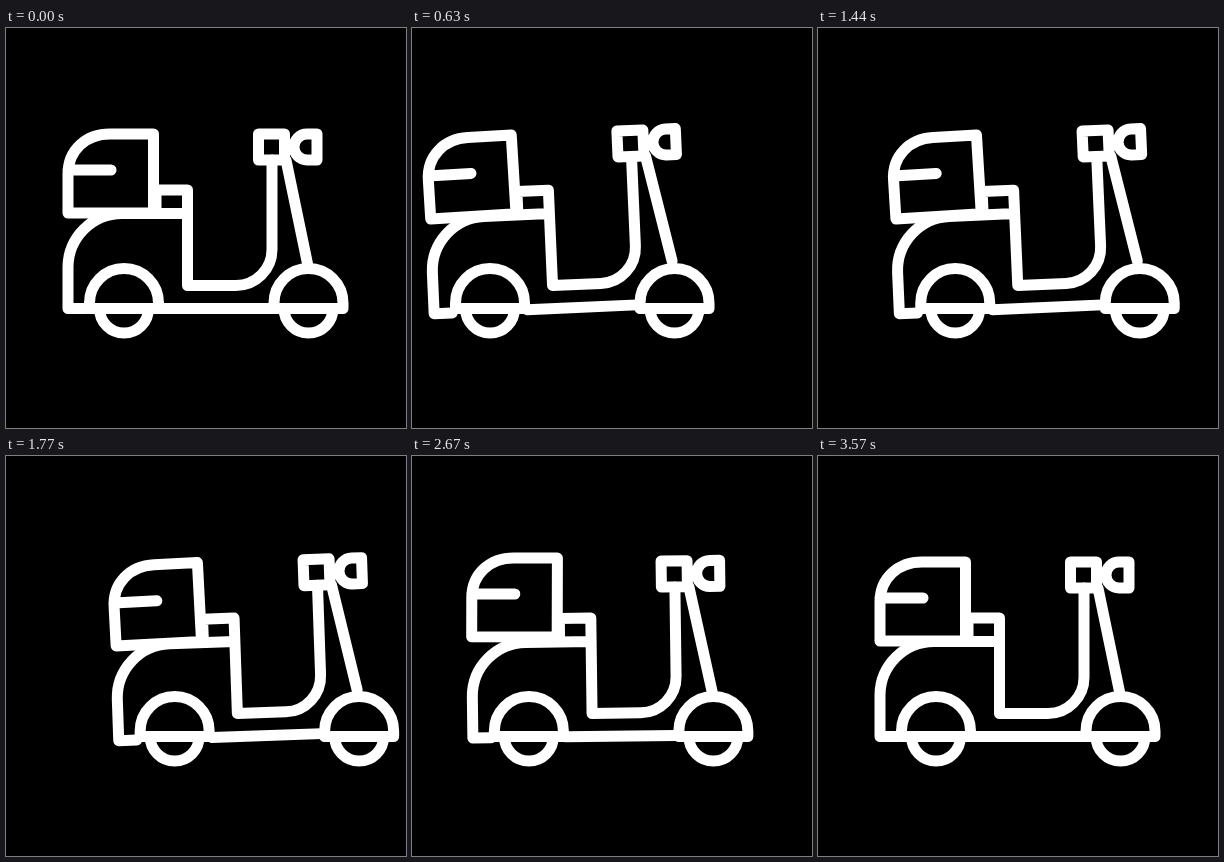
Write an HTML page that moves like this. It is 400x400 px and loops after 3.6 s.

```html
<!DOCTYPE html>
<html lang="en">
<head>
<meta charset="utf-8">
<title>Scooter</title>
<style>
html, body { margin: 0; width: 100%; height: 100%; overflow: hidden; background: #000; }
svg { display: block; width: 100%; height: 100%; }
</style>
</head>
<body>
<svg viewBox="0 0 400 400" fill="none" stroke="#fff" stroke-width="11" stroke-linecap="round" stroke-linejoin="round">
  <defs>
    <path id="wheel" d="M-34.5 280.5V275A34.5 34.5 0 0 1 34.5 275V280.5ZM-24.5 280.5A24.5 24.5 0 0 0 24.5 280.5"/>
  </defs>
  <g id="scooter">
    <g id="body">
      <path d="M80 280.5H62V239A54 54 0 0 1 116 185.5H181.5M150 185.5V162H181.5V257.5H230A36 36 0 0 0 266 221.5V132"/>
      <path d="M155 280.5H265M280 132L302 238"/>
      <path d="M252.5 106H278.5V132H252.5ZM311 106H301A13 13 0 0 0 301 132H311Z"/>
      <path id="box" d="M62 185V146C62 122 80 106 104 106H147.5V185ZM62 142H105"/>
    </g>
    <use id="rear" href="#wheel"/>
    <use id="front" href="#wheel"/>
  </g>
</svg>
<script>
const LOOP = 3600, STEP = 30;
const BRAKE = 2260; // moment of the hardest braking

const part = (t, from, to) => Math.min(1, Math.max(0, (t - from) / (to - from)));
const ease = (t, from, to) => {
  const u = part(t, from, to);
  return u * u * (3 - 2 * u);
};
const place = (id, value) => document.getElementById(id).setAttribute("transform", value);

function draw(t) {
  // Back up, dash forward, return and settle.
  const sway = Math.sin(2 * Math.PI * part(t, 2430, 3230));
  const x = -40 * ease(t, 0, 640) + 93 * ease(t, 815, 1870) - 53 * ease(t, 1910, 2430) - 1.2 * sway;

  // Lean back, pitch forward, rock back, level out.
  const tilt = -2.5 * ease(t, 0, 600) + 5.1 * ease(t, 1650, BRAKE)
    - 4.4 * ease(t, BRAKE, 2860) + 1.8 * ease(t, 2860, 3240);

  // The box is thrown up by the braking and sinks back.
  const boxTilt = -ease(t, 0, 600) + 4.1 * ease(t, 1800, BRAKE) - 3.1 * ease(t, BRAKE, 2900);
  const hop = 10.5 * ease(t, 1900, BRAKE) * (1 - part(t, BRAKE, LOOP)) ** 2;
  const dip = ease(t, 1950, BRAKE) - ease(t, BRAKE, 2520);

  place("scooter", `translate(${x} 0)`);
  place("body", `rotate(${tilt} 182 280)`);
  place("box", `translate(${hop * 0.15} ${-hop}) rotate(${boxTilt} 104 146)`);
  place("rear", `translate(118 ${-4.5 * dip})`);
  place("front", `translate(302.5 310) scale(${1 + 0.06 * dip} ${1 - 0.07 * dip}) translate(0 -310)`);
}

const start = performance.now();
function tick() {
  const t = (performance.now() - start) % LOOP;
  draw(Math.floor(t / STEP) * STEP);
  requestAnimationFrame(tick);
}
tick();
</script>
</body>
</html>
```
